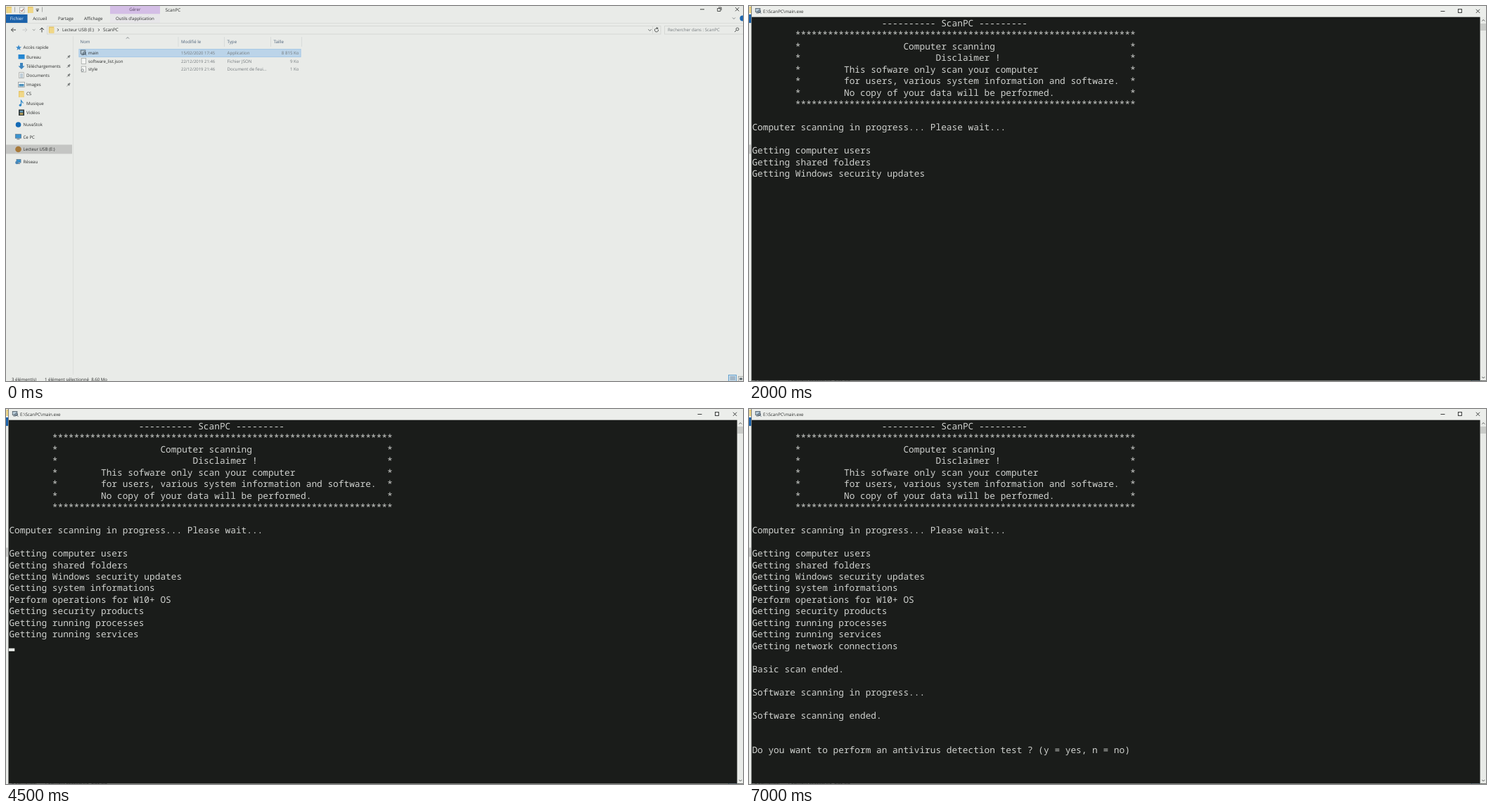
An HTML page with a canvas that plays this animation: 1048 px wide and 534 px high, repeating every 8000 ms.

```html
<!DOCTYPE html>
<html lang="fr">
<head>
<meta charset="utf-8">
<title>ScanPC</title>
<style>
html, body { margin: 0; width: 100%; height: 100%; overflow: hidden; background: #e9ebe8; }
canvas { display: block; }
</style>
</head>
<body>
<canvas id="stage" width="1048" height="534"></canvas>
<script>
const ctx = document.getElementById('stage').getContext('2d');
const UI = '"Open Sans", "Noto Sans", sans-serif';
const MONO = '"Noto Sans Mono", "DejaVu Sans Mono", monospace';
const PAPER = '#e9ebe8', INK = '#2b2d2c', MUTED = '#747a7d', LOOP = 8000;

function box(x, y, w, h, fill) {
  ctx.fillStyle = fill;
  ctx.fillRect(x, y, w, h);
}

function frame(x, y, w, h, color, lw = 1) {
  ctx.strokeStyle = color;
  ctx.lineWidth = lw;
  ctx.strokeRect(x, y, w, h);
}

function line(color, lw, ...p) {
  ctx.strokeStyle = color;
  ctx.lineWidth = lw;
  ctx.beginPath();
  for (let i = 0; i < p.length; i += 2) ctx.lineTo(p[i], p[i + 1]);
  ctx.stroke();
}

function poly(fill, ...p) {
  ctx.fillStyle = fill;
  ctx.beginPath();
  for (let i = 0; i < p.length; i += 2) ctx.lineTo(p[i], p[i + 1]);
  ctx.fill();
}

function dot(x, y, r, fill) {
  ctx.fillStyle = fill;
  ctx.beginPath();
  ctx.arc(x, y, r, 0, 7);
  ctx.fill();
}

function ring(x, y, r, color, from = 0, to = 7) {
  ctx.strokeStyle = color;
  ctx.lineWidth = 0.9;
  ctx.beginPath();
  ctx.arc(x, y, r, from, to);
  ctx.stroke();
}

// y is the vertical middle of the text line
function label(s, x, y, color = INK, size = 6.15, align = 'left') {
  ctx.font = size + 'px ' + UI;
  ctx.textAlign = align;
  ctx.fillStyle = color;
  ctx.fillText(s, x, y + 2.2);
}

function chevron(x, y, r, color, dy = 1) {
  line(color, 0.9, x - r, y - r / 2 * dy, x, y + r / 2 * dy, x + r, y - r / 2 * dy);
}

function cross(x, y, r) {
  line(INK, 0.9, x - r, y - r, x + r, y + r);
  line(INK, 0.9, x - r, y + r, x + r, y - r);
}

function folder(x, y) {
  box(x, y, 7.5, 9, '#e5c568');
  box(x + 1, y + 1.5, 6.5, 7.5, '#f0d787');
}

function page(x, y, h = 8) {
  box(x, y, 6.5, h, '#f4f5f3');
  frame(x, y, 6.5, h, '#9a9d9b', 0.7);
}

function scanIcon(x, y) {
  box(x, y, 6.5, 5, '#b8cbd8');
  frame(x, y, 6.5, 5, '#53616c', 0.9);
  box(x + 1, y + 6, 3.5, 1, '#53616c');
  ring(x + 5.3, y + 4.2, 1.8, '#3d4f5e');
  line('#3d4f5e', 1, x + 6.5, y + 5.7, x + 8, y + 7.2);
}

function pin(x, y) {
  line('#777b7a', 0.8, x - 2.5, y + 2.5, x, y);
  line('#777b7a', 1.6, x - 1, y - 1, x + 1.2, y + 1.2);
  line('#777b7a', 1.8, x, y, x + 2, y - 2);
}

function monitor(x, y, w, h) {
  box(x, y, w, h, '#3993d0');
  frame(x, y, w, h, '#5d7385', 0.7);
  box(x + w / 2 - 2, y + h + 1, 4, 1, '#6b7e8b');
}

function sidebar() {
  box(95, 43, 1, 482, '#dcdedb');
  box(0, 197.5, 94, 13, '#c4c5c3');

  ctx.fillStyle = '#3c8bcb';
  ctx.beginPath();
  for (let i = 0; i < 10; i++) {
    const r = i % 2 ? 1.8 : 4.2, a = i * Math.PI / 5 - Math.PI / 2;
    ctx.lineTo(18 + r * Math.cos(a), 59.5 + r * Math.sin(a));
  }
  ctx.fill();
  label('Accès rapide', 24.5, 59);

  ['Bureau', 'Téléchargements', 'Documents', 'Images', 'CS', 'Musique', 'Vidéos']
    .forEach((s, i) => {
      const y = 72.3 + i * 13.2;
      label(s, 29, y);
      if (i < 4) pin(89, y);
    });
  box(17.5, 69, 9, 6.5, '#2487d2');
  poly('#3b83bd', 20, 81, 24, 81, 24, 85.5, 26.5, 85.5, 22, 90, 17.5, 85.5, 20, 85.5);
  page(18.7, 94.7);
  for (const y of [97, 99, 101]) line('#6a90ad', 0.8, 20, y, 24, y);
  box(17.5, 108.5, 9, 7, '#f2f4f2');
  frame(17.5, 108.5, 9, 7, '#8a9294', 0.7);
  box(18.5, 111, 7, 3.5, '#4d92bd');
  folder(18, 121);
  line('#2c86c8', 1.2, 21.5, 142, 21.5, 134.5, 24.5, 138.5);
  dot(20.3, 141.3, 1.7, '#2c86c8');
  box(18, 147.5, 8, 8.5, '#2f3739');
  box(19.7, 149, 4.6, 2.5, '#69a1c0');
  box(19.7, 152.3, 4.6, 2.5, '#c1a85f');

  dot(17.5, 169, 3.8, '#1269b5');
  label('NuvaStok', 24.5, 169);
  monitor(13.3, 182.7, 8.2, 5.5);
  label('Ce PC', 24.5, 186.7);
  dot(17.5, 204, 4.3, '#a7793a');
  label('Lecteur USB (E:)', 24.5, 204.2);
  monitor(15, 218.5, 6, 4.5);
  dot(15.5, 223, 2.3, '#4b86b4');
  label('Réseau', 24.5, 221.8);
}

function fileList() {
  const head = '#4d6279';
  chevron(173, 45.5, 2, '#747a7d', -1);
  label('Nom', 105.5, 51, head);
  label('Modifié le', 249, 51, head);
  label('Type', 314.5, 51, head);
  label('Taille', 380.5, 51, head);
  for (const x of [244.5, 310, 376, 420]) box(x, 44, 1, 14, '#d8dbda');

  box(103.5, 61, 316, 12, '#bbd4e9');
  frame(104, 61.5, 315, 11, '#a5c9e5', 0.8);
  [
    ['main', '15/02/2020 17:45', 'Application', '8 815 Ko'],
    ['software_list.json', '22/12/2019 21:46', 'Fichier JSON', '9 Ko'],
    ['style', '22/12/2019 21:46', 'Document de feui...', '1 Ko']
  ].forEach(([name, date, type, size], i) => {
    const y = 67 + i * 11.6;
    label(name, 117, y);
    label(date, 249, y, MUTED, 5.95);
    label(type, 314.5, y, MUTED);
    label(size, 416.5, y, MUTED, 6.15, 'right');
  });
  scanIcon(106.3, 63);
  page(107.2, 74.4);
  page(107.2, 86);
  ring(108.8, 91.5, 1.7, '#7d8588');
}

function explorer() {
  box(0, 0, 1048, 534, PAPER);

  // title bar and ribbon tabs
  folder(0.5, 1);
  box(12, 1.5, 1, 7, '#a5a8a6');
  page(19.5, 2);
  line('#8c4a3c', 1, 21, 6, 22.5, 8, 25, 4);
  folder(31, 1);
  line(INK, 0.8, 42.5, 4.5, 47, 4.5);
  poly(INK, 42.7, 6, 46.7, 6, 44.7, 8);
  box(51, 1.5, 1, 7, '#a5a8a6');
  box(148, 0, 71, 11.5, '#d4bee6');
  box(148, 11.5, 71, 12.5, '#e7e6e9');
  label('Gérer', 183.3, 5, '#574463', 6.15, 'center');
  label('ScanPC', 226.5, 5.5, INK, 6.4);
  line(INK, 0.9, 987, 4.8, 993, 4.8);
  frame(1011.8, 3.4, 4, 4, INK, 0.8);
  line(INK, 0.8, 1013, 2, 1017.2, 2, 1017.2, 6.2);
  cross(1039.7, 4.7, 2.6);
  box(0, 12, 30.5, 12, '#1c62aa');
  label('Fichier', 15.3, 18, '#f0f4f8', 6.15, 'center');
  label('Accueil', 38.2, 18);
  label('Partage', 74, 18);
  label('Affichage', 111, 18);
  label("Outils d'application", 183.3, 18, INK, 6.15, 'center');
  chevron(1035, 17.5, 2, '#747a7d');
  dot(1047.5, 17.5, 4, '#1f68b1');
  box(0, 24, 1048, 1, '#dadcd9');

  // address bar
  line(INK, 0.9, 14, 34, 7.5, 34);
  line(INK, 0.9, 10.5, 31, 7.5, 34, 10.5, 37);
  line('#c2c5c3', 0.9, 23.5, 34, 30, 34);
  line('#c2c5c3', 0.9, 27, 31, 30, 34, 27, 37);
  chevron(39.7, 34, 1.8, '#8c908e');
  line(INK, 0.9, 51, 37.5, 51, 31);
  line(INK, 0.9, 48, 34, 51, 31, 54, 34);
  frame(58.5, 28.5, 872.5, 11.5, '#d6d8d5');
  folder(60.8, 29.5);
  line(INK, 0.8, 73, 32.2, 74.8, 34, 73, 35.8);
  label('Lecteur USB (E:)', 80, 34);
  line(INK, 0.8, 131, 32.2, 132.8, 34, 131, 35.8);
  label('ScanPC', 138, 34, INK, 6.4);
  chevron(915.5, 34.3, 2.2, '#5a5e5c');
  box(919, 28.5, 1, 11.5, '#d6d8d5');
  ring(925, 34.3, 2.6, '#4d514f', -0.3, 4.9);
  poly('#4d514f', 925, 30, 928, 31.8, 925, 33.3);
  frame(936.5, 28.5, 115, 11.5, '#d6d8d5');
  label('Rechercher dans : ScanPC', 941, 34, MUTED);
  ring(1040, 33, 2, '#4d514f');
  line('#4d514f', 1, 1038.5, 34.5, 1036.2, 37);

  sidebar();
  fileList();

  label('3 élément(s)', 8, 531.8);
  label('1 élément sélectionné  8,60 Mo', 55, 531.8);
  box(1027, 525.5, 12, 9, '#c9dfef');
  frame(1027.5, 525.5, 11, 10, '#5f9dc9', 0.9);
  for (const y of [528, 530, 532]) line('#68798a', 0.8, 1029.5, y, 1037, y);
  frame(1041.5, 527.5, 8, 8, '#9fa3a1', 0.8);
  box(1043, 529.5, 4, 3, '#5e6a70');
}

// console rows: [time, row, column, text]
const stars = '*'.repeat(63);
const rows = [
  [500, 0, 24, '---------- ScanPC ---------'],
  [500, 1, 8, stars],
  [500, 2, 28, 'Computer scanning'],
  [500, 3, 34, 'Disclaimer !'],
  [500, 4, 17, 'This sofware only scan your computer'],
  [500, 5, 17, 'for users, various system information and software.'],
  [500, 6, 17, 'No copy of your data will be performed.'],
  [500, 7, 8, stars],
  [500, 9, 0, 'Computer scanning in progress... Please wait...'],
  [1000, 11, 0, 'Getting computer users'],
  [1500, 12, 0, 'Getting shared folders'],
  [2000, 13, 0, 'Getting Windows security updates'],
  [2500, 14, 0, 'Getting system informations'],
  [3000, 15, 0, 'Perform operations for W10+ OS'],
  [3500, 16, 0, 'Getting security products'],
  [4000, 17, 0, 'Getting running processes'],
  [4500, 18, 0, 'Getting running services'],
  [5000, 19, 0, 'Getting network connections'],
  [5500, 21, 0, 'Basic scan ended.'],
  [6000, 23, 0, 'Software scanning in progress...'],
  [6500, 25, 0, 'Software scanning ended.'],
  [7000, 28, 0, 'Do you want to perform an antivirus detection test ? (y = yes, n = no)']
];
for (let r = 2; r < 7; r++) rows.push([500, r, 8, '*'], [500, r, 70, '*']);

// half-second steps in which the cursor is lit, with its row
const cursor = { 2: 12, 3: 13, 6: 16, 7: 17, 8: 18, 9: 19, 10: 20, 12: 25 };
const CELL = 7.68, PITCH = 16.46;

function consoleWindow(t) {
  // window border, with the explorer showing faintly through
  box(3, 0, 1, 534, '#7c7f7d');
  box(4, 533, 1044, 1, 'rgba(40, 42, 40, 0.6)');

  box(4, 0, 1044, 16, '#eceeeb');
  scanIcon(9.3, 3.5);
  label('E:\\ScanPC\\main.exe', 20, 7.5, INK, 6.25);
  line(INK, 0.9, 983.5, 7.5, 989.5, 7.5);
  frame(1008.5, 4.5, 5, 5, INK, 0.9);
  cross(1036.5, 7.3, 2.6);

  box(1039, 16, 9, 517, '#e9ebe8');
  box(4, 15.7, 1035.6, 517.3, '#1a1c1a');
  box(1040, 25, 8, 10, '#c9cbc8');
  chevron(1044.3, 20.5, 2, '#4d514f', -1);
  chevron(1044.3, 529, 2, '#4d514f');

  ctx.font = '12.8px ' + MONO;
  ctx.textAlign = 'left';
  ctx.fillStyle = '#d0d2cf';
  for (const [at, row, col, text] of rows) {
    if (t >= at) ctx.fillText(text, 4.4 + col * CELL, 29.02 + row * PITCH);
  }
  const lit = cursor[Math.floor(t / 500)];
  if (lit) box(4, 28 + lit * PITCH, 8.3, 4.2, '#e6e8e5');
}

function draw(now) {
  const t = now % LOOP;
  ctx.textRendering = 'geometricPrecision';
  explorer();
  if (t >= 500) consoleWindow(t);
  requestAnimationFrame(draw);
}
requestAnimationFrame(draw);
</script>
</body>
</html>
```
